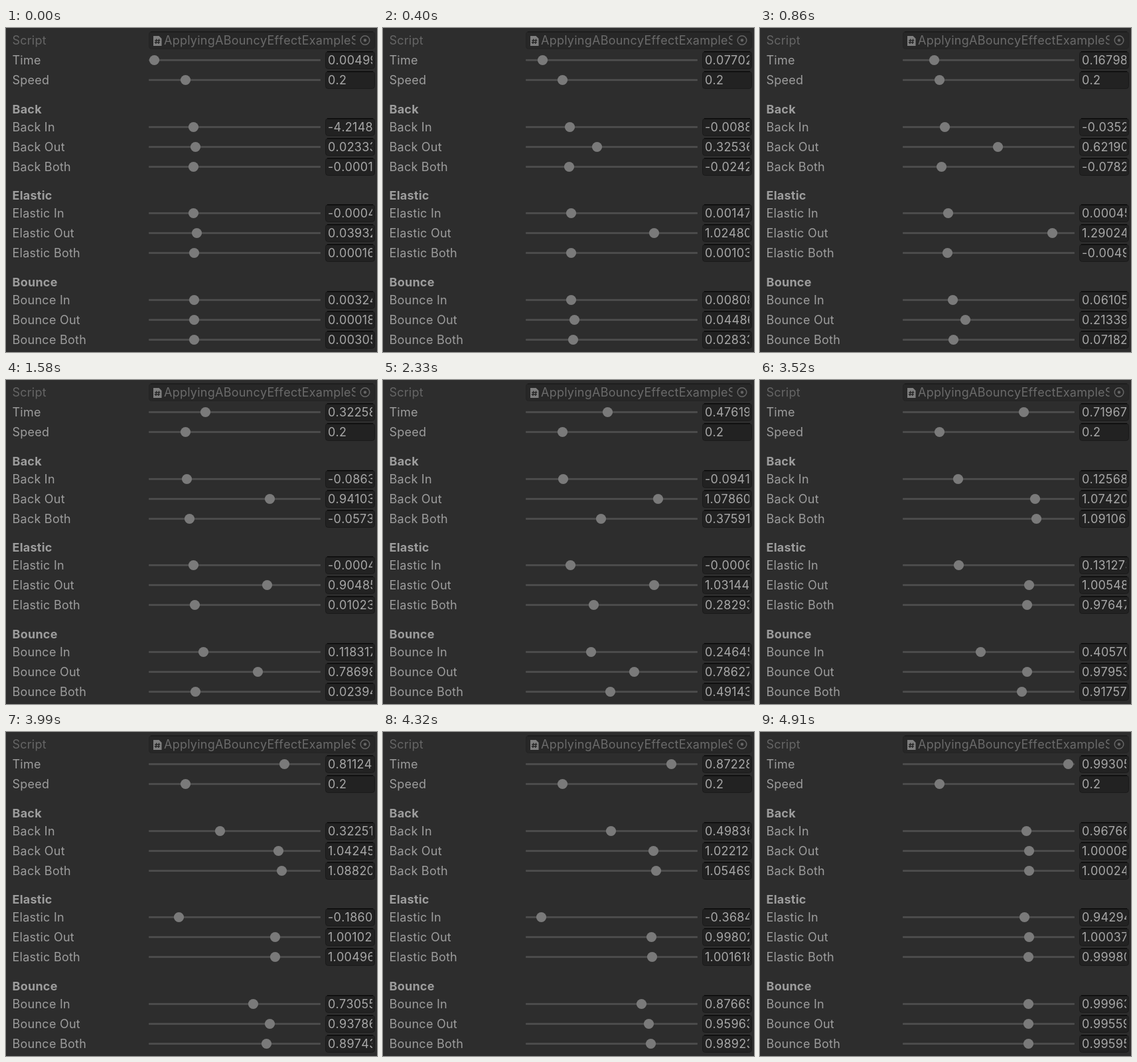
These frames come from a looping animation (559 by 489 pixels, 5040 ms). An HTML page:

```html
<!DOCTYPE html>
<html lang="en">
<head>
<meta charset="utf-8">
<title>Easing inspector</title>
<style>
html, body { margin: 0; width: 100%; height: 100%; overflow: hidden; background: #2d2d2d; }
svg { display: block; width: 559px; height: 489px; }
text {
  font: 18px Inter, "Open Sans", sans-serif;
  font-kerning: none;
  font-optical-sizing: none;
  font-feature-settings: "calt" 0;
  letter-spacing: .25px;
  fill: #9d9d9d;
  white-space: pre;
}
.head { font-weight: 700; }
.value { fill: #a8a8a8; }
.track { fill: #4b4b4b; }
.knob { fill: #7a7a7a; }
.field { fill: #222; stroke: #1a1a1a; }
.edge { stroke: #0a0a0a; stroke-width: 1.5; }
.off { opacity: .5; }
</style>
</head>
<body>
<svg id="panel" viewBox="0 0 559 489">
  <defs>
    <clipPath id="valueClip"><rect x="484" y="0" width="68" height="489"/></clipPath>
    <clipPath id="nameClip"><rect x="236" y="5" width="290.5" height="27"/></clipPath>
  </defs>
  <g class="off">
    <text x="9.5" y="25">Script</text>
    <rect class="field" x="215.5" y="5.5" width="340" height="26" rx="4"/>
    <path class="edge" d="M218 5.8H553"/>
    <path fill="#d0d0d0" d="M222 12h8.5l4 4v11H222z"/>
    <path stroke="#222" stroke-width="1.4" d="M226.8 16.5l-1 7.5M230.6 16.5l-1 7.5M224.2 18.8h8M223.8 21.8h8"/>
    <g clip-path="url(#nameClip)"><text class="value" x="238" y="25">ApplyingABouncyEffectExampleScript</text></g>
    <circle cx="541" cy="18.5" r="6.8" fill="none" stroke="#9d9d9d" stroke-width="1.5"/>
    <circle cx="541" cy="18.5" r="2.2" fill="#9d9d9d"/>
  </g>
</svg>
<script>
const LOOP = 5040;
// Moments at which the panel repaints, in ms
const TICKS = [0, 70, 200, 400, 530, 660, 860, 990, 1120, 1320, 1450, 1580, 1710, 1840,
  2070, 2200, 2330, 2470, 2670, 2800, 2930, 3130, 3260, 3390, 3520, 3720, 3850, 3990,
  4120, 4320, 4450, 4580, 4780, 4910];
// [tick, time value]; ticks between are evenly spaced
const ANCHORS = [[0, .0049968], [1, .0162], [2, .0467], [6, .167982], [11, .322589],
  [16, .476197], [24, .719671], [29, .872289], [33, .993056]];

const { sin, PI, abs, floor } = Math;
const S = 1.70158, S2 = S * 1.525;
const flip = f => t => 1 - f(1 - t);
const both = f => t => t < .5 ? f(2 * t) / 2 : 1 - f(2 - 2 * t) / 2;
const back = s => t => t * t * ((s + 1) * t - s);
const elastic = p => t => -(2 ** (10 * t - 10)) * sin((10 * t - 10 - p * 2.5) * 2 * PI / (p * 10));
const bounceOut = t => {
  const k = 7.5625, d = 2.75;
  if (t < 1 / d) return k * t * t;
  if (t < 2 / d) return k * (t - 1.5 / d) ** 2 + .75;
  if (t < 2.5 / d) return k * (t - 2.25 / d) ** 2 + .9375;
  return k * (t - 2.625 / d) ** 2 + .984375;
};
const bounceIn = flip(bounceOut);

const panel = document.getElementById('panel');
function add(tag, attrs, label) {
  const el = document.createElementNS('http://www.w3.org/2000/svg', tag);
  for (const k in attrs) el.setAttribute(k, attrs[k]);
  if (label) el.textContent = label;
  panel.appendChild(el);
  return el;
}

const rows = [];
function addRow(label, y, ease, min = -.5, max = 1.5) {
  add('text', { x: 9.5, y: y + 6.5 }, label);
  add('rect', { class: 'track', x: 215, y: y - 1.5, width: 259, height: 3, rx: 1 });
  const knob = add('circle', { class: 'knob', cy: y, r: 7.6 });
  add('rect', { class: 'field', x: 481.5, y: y - 13, width: 74, height: 26, rx: 4 });
  add('path', { class: 'edge', d: `M484 ${y - 12.7}H553` });
  const value = add('text', { class: 'value', x: 485, y: y + 6.5, 'clip-path': 'url(#valueClip)' });
  rows.push({ ease, min, max, knob, value });
}
function addGroup(name, y, firstRow, easeIn, easeBoth) {
  add('text', { class: 'head', x: 9.5, y: y + 6.5 }, name);
  addRow(name + ' In', firstRow, easeIn);
  addRow(name + ' Out', firstRow + 30, flip(easeIn));
  addRow(name + ' Both', firstRow + 60, both(easeBoth));
}

addRow('Time', 48.5, t => t, 0, 1);
addRow('Speed', 78.5, () => .2, 0, 1);
addGroup('Back', 122.5, 149.5, back(S), back(S2));
addGroup('Elastic', 252.5, 279.5, elastic(.3), elastic(.45));
addGroup('Bounce', 383.5, 410.5, bounceIn, bounceIn);

function format(v) {
  if (v === .2) return '0.2';
  return abs(v) < 1e-4 ? v.toExponential(6).replace('e-', 'E-0') : v.toPrecision(7);
}
function timeAt(tick) {
  const i = Math.max(1, ANCHORS.findIndex(a => a[0] >= tick));
  const [a, u] = ANCHORS[i - 1], [b, v] = ANCHORS[i];
  return u + (v - u) * (tick - a) / (b - a);
}

let shown = -1;
function draw(tick) {
  const t = timeAt(tick);
  for (const { ease, min, max, knob, value } of rows) {
    const v = ease(t);
    // knobs sit on whole pixels
    knob.setAttribute('cx', floor(215 + 244 * (v - min) / (max - min)) + 7.5);
    value.textContent = format(v);
  }
  shown = tick;
}

let start;
function frame(now) {
  start ??= now;
  const ms = Math.max(0, now - start) % LOOP;
  const tick = TICKS.findLastIndex(x => x <= ms);
  if (tick !== shown) draw(tick);
  requestAnimationFrame(frame);
}
draw(0);
requestAnimationFrame(frame);
</script>
</body>
</html>
```
